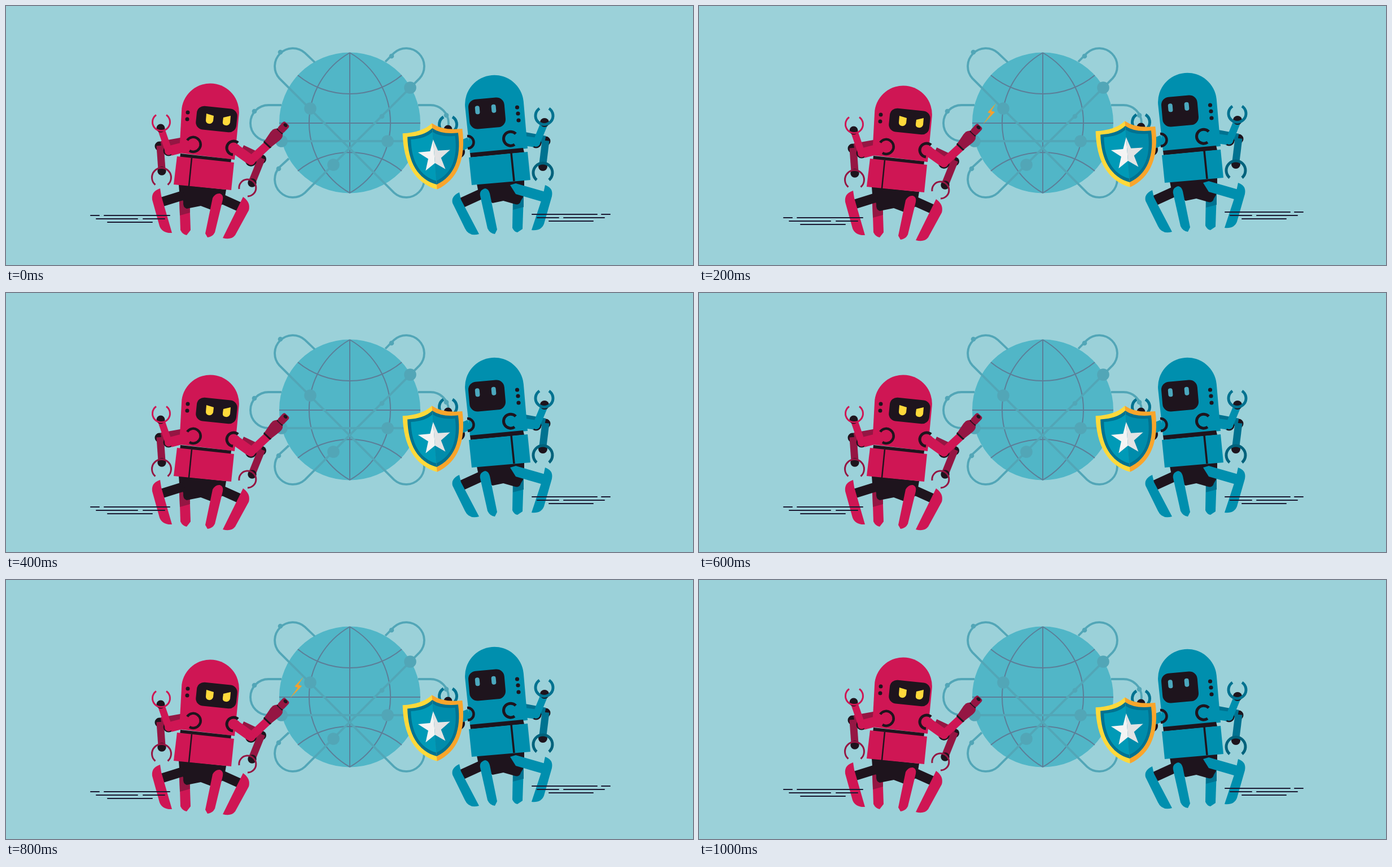
An HTML page for the animation above (1.1 s loop, 1217 by 460 pixels).

```html
<!DOCTYPE html>
<html lang="en">
<head>
<meta charset="utf-8">
<title>Robots and globe</title>
<style>
  html, body { margin: 0; width: 100%; height: 100%; overflow: hidden; background: #9bd1d9; }
  svg { display: block; width: 100vw; height: 100vh; }
  .red { --main: #cf1654; --dark: #951643; }
  .blue { --main: #008fae; --dark: #007290; }
  .m { fill: var(--main); }
  .d { fill: var(--dark); }
  .k { fill: #1e141d; }
  .limb path, .arc { fill: none; }
  .sm { stroke: var(--main); }
  .sd { stroke: var(--dark); }
  .sk { stroke: #1e141d; }
  .orbit { fill: none; stroke: #52a6b7; stroke-width: 3.8; }
  .node { fill: #52a6b7; }
  .grid { fill: none; stroke: #5c7e98; stroke-width: 2; }
  .dash { stroke: #1b1a33; stroke-width: 2; stroke-linecap: round; }

  /* five 2px steps out, five back, then a hold */
  .red, .blue { animation: bob 1.1s infinite; }
  .red { --rise: 10px; }
  .blue { --rise: -10px; }
  @keyframes bob {
    0% { transform: translateY(0); animation-timing-function: steps(5, end); }
    45.453% { transform: translateY(var(--rise)); animation-timing-function: steps(5, end); }
    90.907%, 100% { transform: translateY(0); }
  }
  .bolt { fill: #f7a02b; transform-origin: 514px 187px; animation: spark 1.1s infinite step-end; }
  @keyframes spark {
    0%, 36.362%, 90.908%, 100% { transform: scale(1); visibility: hidden; }
    9.09%, 81.817% { transform: scale(1); visibility: visible; }
    18.181%, 72.726% { transform: scale(.93, .96); visibility: visible; }
    27.272%, 63.635% { transform: translate(-1px, -.5px) scale(.85, .92); visibility: visible; }
  }
</style>
</head>
<body>
<svg viewBox="0 0 1217 460" preserveAspectRatio="none">
  <defs>
    <path id="half" d="M0-59Q-18-44-53-45C-56 8-38 45 0 59Z"/>
    <path id="halfStar" d="M0-30L-7-9.7-28.5-9.3-11.4 3.7-17.6 24.3 0 12Z"/>
  </defs>

  <g id="globe">
    <circle cx="609" cy="207.5" r="125" fill="#51b6c7"/>
    <path class="grid" d="M609 83V332M484 208H734M517 123A144.7 144.7 0 0 0 701 123M517 293A144.7 144.7 0 0 1 701 293M609 83A143.6 143.6 0 0 0 609 332A143.6 143.6 0 0 0 609 83"/>
    <path class="orbit" d="M547 100L529.600 83.400A32 32 0 0 0 484.400 128.600L687.400 331.600A32 32 0 0 0 732.600 286.400L717 271"/>
    <path class="orbit" d="M672 99L687.400 83.400A32 32 0 0 1 732.600 128.600L529.600 331.600A32 32 0 0 1 484.400 286.400L501 271"/>
    <path class="orbit" d="M488 176H465A32 32 0 0 0 465 240H752A32 32 0 0 0 752 176H730"/>
    <g class="node">
      <circle cx="486" cy="82" r="4.3"/><circle cx="683" cy="89" r="4.3"/>
      <circle cx="440" cy="187" r="4.3"/><circle cx="780" cy="194" r="4.3"/>
      <circle cx="666" cy="196" r="4.3"/><circle cx="483" cy="289" r="4.3"/>
      <circle cx="539" cy="182" r="10.8"/><circle cx="716" cy="145" r="10.8"/>
      <circle cx="580" cy="282" r="10.8"/><circle cx="676" cy="240" r="10.8"/>
      <circle cx="488" cy="240" r="10.8"/>
    </g>
  </g>

  <g class="red">
    <!-- rear arms -->
    <g class="limb">
      <circle class="k" cx="272" cy="249" r="8.5"/>
      <path class="sd" stroke-width="16" d="M314 241L275 248"/>
      <path class="sd" stroke-width="13" d="M273 248L276 290"/>
      <circle class="k" cx="276" cy="293" r="7.7"/>
      <path class="sd" stroke-width="3" d="M264.500 317.500A17 17 0 1 1 286.500 317.500"/>
      <circle class="k" cx="453" cy="272" r="8"/>
      <path class="sd" stroke-width="15" d="M418 254L452 270"/>
      <path class="sd" stroke-width="13" d="M453 270L437 310"/>
      <circle class="k" cx="436" cy="314" r="7.7"/>
      <path class="sd" stroke-width="3" d="M413 325A15 15 0 1 1 428 338"/>
    </g>
    <!-- legs -->
    <path class="m" d="M307 340L309 398Q313 406 320 407L327 398 325 340Z"/>
    <path class="d" d="M307 345H325.500L326 367 308 372Z"/>
    <path class="k" d="M306 317L390 326 388 338 384 352 366 363 345 355 320 360Q313 358 314 347L307 330Z"/>
    <path class="arc sk" stroke-width="17" d="M276 348L316 335.500M372 338L423 361"/>
    <path class="m" d="M273 324Q257 329 259 344L272 391Q277 404 294 403L275 337Z"/>
    <path class="m" d="M366 341Q371 332 379 333Q386 336 384 344L370 402Q366 410 357 411L353 404Z"/>
    <path class="m" d="M420 339L384 412Q399 416 406 407L430 363Q434 349 420 339Z"/>
    <!-- body -->
    <path class="m" d="M307 261L311.300 181.700A51 51 0 0 1 412.700 192.300L405 273Z"/>
    <path class="k" d="M309 262L399 272 398 281 308 271Z"/>
    <path class="m" d="M303 267L404 278 399 327 297 317Z"/>
    <path class="sk" stroke-width="2.5" d="M329 270L324 320"/>
    <rect class="k" x="337" y="180" width="72" height="42" rx="13" transform="rotate(6 373 201)"/>
    <g fill="#ffd93b">
      <path d="M355 191L368 195 367 204Q365 210 359 209 354 208 354 203Z"/>
      <path d="M385 198L398 195 397 207Q395 213 389 212 383 211 384 205Z"/>
    </g>
    <circle class="k" cx="322" cy="189" r="3.5"/><circle class="k" cx="321" cy="201" r="3.5"/>
    <!-- left front arm -->
    <g class="limb">
      <circle class="k" cx="288" cy="257" r="9.5"/>
      <path class="sm" stroke-width="18" d="M330 247L291 257"/>
      <circle class="m" cx="331" cy="246" r="9"/>
      <path class="sk" stroke-width="4.500" d="M321 238.500A13 13 0 1 1 325 257"/>
      <path class="sm" stroke-width="12.500" d="M288 257L275 219"/>
      <circle class="m" cx="288" cy="258" r="6.8"/>
      <circle class="k" cx="274" cy="217" r="7.5"/>
      <path class="sm" stroke-width="3" d="M266 193.500A15.500 15.500 0 1 0 284 193.500"/>
    </g>
    <!-- right front arm with blaster -->
    <g class="limb">
      <circle class="k" cx="434" cy="275" r="10"/>
      <path class="sm" stroke-width="18" d="M405 253L433 273"/>
      <circle class="m" cx="406" cy="253" r="9"/>
      <path class="sk" stroke-width="5" d="M411 243A12 12 0 1 0 402 264"/>
      <path class="sm" stroke-width="15" d="M433 275L465 245"/>
      <circle class="m" cx="434" cy="275" r="7.5"/>
    </g>
    <g transform="translate(463 246) rotate(-47)">
      <rect class="k" x="-2" y="-8.500" width="5" height="17" rx="2"/>
      <path class="d" d="M1-8L20-11Q29-12 32-7V7Q29 12 20 11L1 8Z"/>
      <rect class="k" x="31" y="-7" width="2.500" height="14" rx="1"/>
      <rect class="d" x="32.500" y="-7" width="18.500" height="14" rx="4"/>
      <ellipse class="k" cx="47" cy="0" rx="2.800" ry="3.800"/>
    </g>
    <path class="bolt" d="M528 167L511 185 517 187 502 207 525 184 518 182Z"/>
    <path class="dash" d="M150 372H165M174 372H290M160 378H233M243 378H281M180 384H259"/>
  </g>

  <g class="blue">
    <!-- rear arm -->
    <g class="limb">
      <circle class="k" cx="956" cy="240" r="8.500"/>
      <path class="sd" stroke-width="15" d="M912 230L955 238"/>
      <path class="sd" stroke-width="13" d="M956 239L951 280"/>
      <circle class="k" cx="951" cy="285" r="8"/>
      <path stroke="#00627c" stroke-width="5" d="M940 309A17 17 0 1 1 962 309"/>
    </g>
    <!-- legs -->
    <path class="m" d="M898 338L897 394Q900 401 906 402L915 396 917 338Z"/>
    <path class="d" d="M898 340H917V357L898 362Z"/>
    <path class="k" d="M834 316L918 309V336L912 346Q910 354 902 352L881 346 862 350 838 336Z"/>
    <path class="arc sk" stroke-width="18" d="M802 352L850 330"/>
    <path class="m" d="M893 318L903 315 962 332 958 350 903 334Z"/>
    <path class="m" d="M955 318Q970 323 967 338L953 387Q948 400 931 398L951 337Z"/>
    <path class="m" d="M803 331Q788 338 791 350L813 395Q820 410 838 405L806 344Z"/>
    <path class="m" d="M849 324Q838 327 840 337L853 395Q857 404 866 405L870 397 857 333Q855 325 849 324Z"/>
    <!-- arm behind the shield -->
    <g class="limb">
      <circle class="k" cx="802" cy="259" r="11"/>
      <path class="sm" stroke-width="13" d="M792 250L784 222"/>
      <circle class="k" cx="783" cy="219" r="7.500"/>
      <path class="sd" stroke-width="5" d="M775 197A15.500 15.500 0 1 0 791 197"/>
    </g>
    <!-- body -->
    <path class="m" d="M822 262L813.200 178.500A52 52 0 0 1 916.800 169.500L924 253Z"/>
    <path class="k" d="M822 261L916 252 918 260 823 269Z"/>
    <path class="m" d="M820 269L924 259 929 309 825 318Z"/>
    <path class="sk" stroke-width="3.500" d="M895 261L900 311"/>
    <rect class="k" x="820" y="164" width="64" height="53" rx="14" transform="rotate(-5 852 190.500)"/>
    <g fill="#4ca8be" transform="rotate(-5 850 183)">
      <rect x="831" y="176" width="8" height="15" rx="3.800"/>
      <rect x="860" y="176" width="8" height="15" rx="3.800"/>
    </g>
    <g class="k">
      <circle cx="905.500" cy="180" r="3.600"/><circle cx="907" cy="191" r="3.600"/><circle cx="908" cy="203" r="3.600"/>
    </g>
    <g class="limb">
      <path class="sm" stroke-width="18" d="M821 242L798 251"/>
      <path class="sk" stroke-width="4.500" d="M817 231A11 11 0 1 1 818 253"/>
      <!-- right front arm -->
      <circle class="k" cx="939" cy="243" r="9.500"/>
      <path class="sm" stroke-width="17" d="M893 236L936 242"/>
      <circle class="m" cx="893" cy="236" r="9"/>
      <path class="sk" stroke-width="5" d="M903 227A12.500 12.500 0 1 0 901 246"/>
      <path class="sm" stroke-width="13" d="M939 244L953 210"/>
      <circle class="m" cx="939" cy="243" r="7"/>
      <circle class="k" cx="954" cy="207" r="8"/>
      <path class="sd" stroke-width="5" d="M945 182A15.500 15.500 0 1 0 962 182"/>
    </g>
    <!-- shield -->
    <g transform="translate(759 267) rotate(-4.500)">
      <use href="#half" fill="#ffd93b"/>
      <use href="#half" fill="#f9a52b" transform="scale(-1 1)"/>
      <g transform="scale(.85)">
        <use href="#half" class="d"/>
        <use href="#half" class="d" transform="scale(-1 1)"/>
      </g>
      <g transform="scale(.74)">
        <use href="#half" fill="#009ab7"/>
        <use href="#half" fill="#008cab" transform="scale(-1 1)"/>
      </g>
      <use href="#halfStar" fill="#f4f4f4"/>
      <use href="#halfStar" fill="#e2e3e4" transform="scale(-1 1)"/>
    </g>
    <path class="dash" d="M932 370H1047M1055 370H1070M941 376H979M988 376H1060M962 382H1040"/>
  </g>
</svg>
</body>
</html>
```
